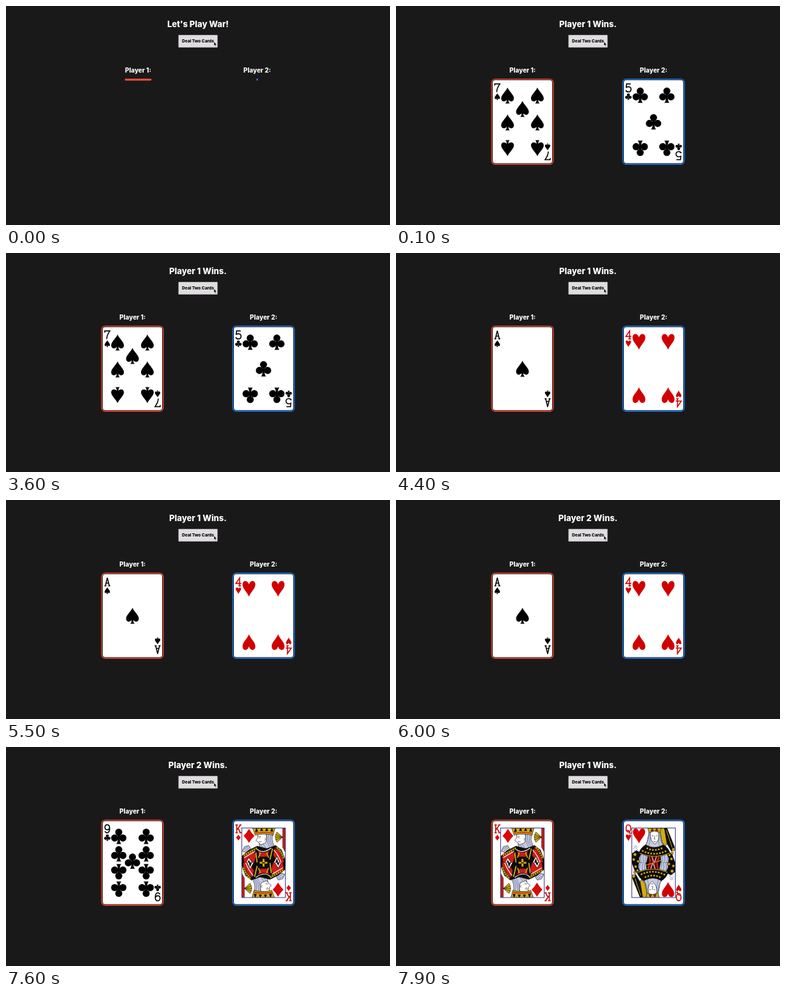
Animation, 600 px wide and 342 px high, one loop 8 s. Source, as an HTML page:

```html
<!DOCTYPE html>
<html lang="en">
<head>
<meta charset="utf-8">
<title>War</title>
<style>
html, body { margin: 0; width: 100%; height: 100%; overflow: hidden; background: #191919; }
svg { display: block; width: 600px; height: 342px; }
text { font-family: Inter, Roboto, sans-serif; font-weight: 800; text-anchor: middle; fill: #fff; }
.title { font-size: 13px; }
.label { font-size: 9.9px; }
.deal { font-size: 6.5px; fill: #000; }

/* every change is a hard cut on one shared 8 s clock */
.start, .table, .one, .two, .d1, .d2, .d3, .d4 { visibility: hidden; animation: 8s step-end -20ms infinite; }
.start { animation-name: start; }
.table { animation-name: table; }
.one { animation-name: one; }
.two { animation-name: two; }
.d1 { animation-name: d1; }
.d2 { animation-name: d2; }
.d3 { animation-name: d3; }
.d4 { animation-name: d4; }
.button { fill: #e0dde0; animation: press 8s step-end -20ms infinite; }
@keyframes start { 0% { visibility: visible } 1.25%, 100% { visibility: hidden } }
@keyframes table { 0% { visibility: hidden } 1.25%, 100% { visibility: visible } }
@keyframes one { 0%, 75% { visibility: hidden } 1.25%, 97.5%, 100% { visibility: visible } }
@keyframes two { 0%, 97.5%, 100% { visibility: hidden } 75% { visibility: visible } }
@keyframes d1 { 0%, 47.5%, 100% { visibility: hidden } 1.25% { visibility: visible } }
@keyframes d2 { 0%, 76.25%, 100% { visibility: hidden } 47.5% { visibility: visible } }
@keyframes d3 { 0%, 98.75%, 100% { visibility: hidden } 76.25% { visibility: visible } }
@keyframes d4 { 0% { visibility: hidden } 98.75%, 100% { visibility: visible } }
@keyframes press { 0%, 45%, 72.5%, 95%, 100% { fill: #e0dde0 } 43.75%, 71.25%, 93.75% { fill: #eceaec } }

.gold { fill: #d0ab14; }
.red { fill: #d01c18; }
.ink { fill: #0c0c0c; }
.pale { fill: #c6cbe0; }
.white { fill: #fff; }
.line { fill: none; }
.blue { fill: none; stroke: #4a5296; }
.goldline { fill: none; stroke: #d0ab14; }
.redline { fill: none; stroke: #d01c18; }
</style>
</head>
<body>
<svg id="stage" viewBox="0 0 600 342">
  <defs>
    <path id="spade" d="M0-12.5C2-7 10-1 10 4.5C10 9.7 4 10.7 1.3 6.8C1.5 10 2 11.5 3.6 12.5H-3.6C-2 11.5-1.5 10-1.3 6.8C-4 10.7-10 9.7-10 4.5C-10-1-2-7 0-12.5Z"/>
    <g id="club">
      <circle cy="-6.5" r="5.5"/><circle cx="-6.4" cy="2.6" r="5.6"/><circle cx="6.4" cy="2.6" r="5.6"/>
      <path d="M-2-3H2L1.4 3Q1.6 10 4 12H-4Q-1.6 10-1.4 3Z"/>
    </g>
    <path id="heart" fill="#d00000" d="M0 12.5C-2 6-10 0-10-6.3C-10-14-1.5-13.8 0-6.5C1.5-13.8 10-14 10-6.3C10 0 2 6 0 12.5Z"/>
    <path id="diamond" fill="#d80a0a" d="M0-11.5Q3.7-5 8.8 0Q3.7 5 0 11.5Q-3.7 5-8.8 0Q-3.7-5 0-11.5Z"/>
    <clipPath id="half"><rect x="-34" y="-54" width="68" height="54.2"/></clipPath>

    <g id="king" stroke="#000" stroke-width=".6">
      <!-- drape and fan -->
      <path class="red" d="M30-54H34V-17L30-24Z"/>
      <path class="gold" d="M30-40L21-48Q16-40 21-32Z"/>
      <path class="line" d="M30-40L19-44M30-40H18M30-40L19-36"/>
      <!-- head -->
      <path class="pale" d="M1-45H15Q11-37 17-26L6-22L-6-24L-7-31Z"/>
      <path class="blue" d="M5-44Q4-34 10-24M8-44Q6-34 13-25M12-44Q8-35 15-26M-5-29L0-23M-1-29L4-23"/>
      <path class="white" d="M-9-45H4Q6-36 3-31L-5-28L-8-32L-12-35L-9-39Z"/>
      <path class="line" d="M-8-41h4M-7-39h2M-7-33h4M2-39q3 1 0 4"/>
      <path class="gold" d="M-13-43L-17-54H18L15-43Q0-47-13-43Z"/>
      <path class="redline" stroke-width="1.6" d="M-13-46Q1-49 15-46"/>
      <path class="ink" d="M-13-48l2-6 2 5zM-5-50l2-4 2 4zM3-50l2-4 2 4zM11-49l2-5 2 5z"/>
      <!-- hand -->
      <path class="pale" d="M-33-18L-30-25L-23-27L-20-22L-27-16Z"/>
      <path class="blue" d="M-31-21l7-4M-29-18l7-6"/>
      <!-- robe -->
      <path class="ink" d="M-34 1V-10L-24-19L-10-26L5-22L19-27L28-20L34-5V1Z"/>
      <path class="red" d="M-30 1L-32-9L-17-19L-11-12L-15 1Z"/>
      <path class="goldline" stroke-width="3" d="M-32-11L-10-23"/>
      <path class="line" stroke-width="1.6" stroke-dasharray="1.5 2" d="M-32-11L-10-23"/>
      <path class="line" stroke="#fff" stroke-width="1.2" d="M-30-8L-13-18M-10-21Q-1-13 12-23"/>
      <path class="red" d="M-9-19Q0-13 10-20L5-9H-6Z"/>
      <path class="goldline" stroke-width="1.8" d="M-12-16L-10 0M-5-16L-8-7M5-16L8-7M14-22L10-5"/>
      <path class="red" d="M17-23L23-20L32-3V1H23L15-12Z"/>
      <path class="goldline" stroke-width="3" d="M20-25Q28-18 32-6"/>
      <path class="line" stroke-width="1.5" stroke-dasharray="1.5 2" d="M20-25Q28-18 32-6"/>
      <path class="line" stroke="#fff" stroke-width="1.1" d="M16-20Q22-14 28 0"/>
      <path class="white" d="M26 1L21-10L15 1ZM-17 1L-23-8L-28 1Z"/>
      <path class="ink" d="M23 1L21-6L18 1ZM-20 1L-23-4L-25 1Z"/>
    </g>

    <g id="queen" stroke="#000" stroke-width=".6">
      <!-- throne -->
      <path class="gold" d="M9-54H20L25-36L19-26L13-32Z"/>
      <path class="ink" d="M17-54H21L33-24L28-18L21-30Z"/>
      <path class="goldline" stroke-width="1" d="M20-51L29-24"/>
      <!-- head -->
      <path class="pale" d="M-7-49Q1-57 10-49L13-32L19-24L1-17L-15-24L-10-32Z"/>
      <path class="blue" d="M-6-46Q-8-35-13-25M-5-43Q-5-34-8-24M9-46Q9-36 15-26M8-42Q7-33 10-24"/>
      <path class="gold" d="M-7-47L-9-54H12L10-47Q2-52-7-47Z"/>
      <path class="red" d="M-4-50l2-4 2 4zM3-50l2-4 2 4z"/>
      <path class="white" d="M-5-47Q2-52 8-47Q10-35 2-29Q-6-35-5-47Z"/>
      <path class="line" d="M-3-42h3M4-42h3M2-42l-1 5h2M0-33h4"/>
      <!-- gown -->
      <path class="ink" d="M-34 1V-14L-27-19L-19-15L-16 1ZM17 1L21-16L29-13L34 1Z"/>
      <path class="pale" d="M-18-17L-8-10L-10 1H-22L-23-7ZM20-17L10-10L11 1H23L24-7Z"/>
      <path class="blue" d="M-19-14Q-22-6-19 0M-15-13Q-18-6-15 0M-11-11Q-14-5-12 0M21-14Q24-6 20 0M17-13Q19-6 16 0M13-11Q15-5 13 0"/>
      <path class="ink" d="M-8-14H10L12 1H-11Z"/>
      <path class="redline" stroke-width="2.6" d="M-7-12L-5 0M9-12L6 0M-2-11L-1 0M4-11L3 0"/>
      <path class="line" stroke="#dde" stroke-width="1" d="M-4-12L1-1L6-12"/>
      <path class="ink" d="M-23-15Q-19-25-12-28Q1-20 15-28Q22-25 26-15Q1-4-23-15Z"/>
      <path class="goldline" stroke-width="2.4" stroke-dasharray="2.6 2" d="M-18-19Q1-9 21-19M-11-23Q1-17 14-23"/>
      <path class="goldline" stroke-width="1" d="M-22-15Q1-5 25-15"/>
      <!-- flowers -->
      <g class="gold"><circle cx="-29" cy="-13" r="2.6"/><circle cx="-31" cy="-5" r="2.3"/><circle cx="-24" cy="-2" r="2.3"/><circle cx="28" cy="-6" r="2.3"/><circle cx="25" cy="-12" r="2"/><circle cx="31" cy="-21" r="2.5"/><circle cx="29" cy="-15" r="2"/></g>
      <path class="blue" d="M-32-21q3-5 6-1t-5 3M-31-25q4-3 6 1"/>
    </g>
  </defs>

  <rect width="600" height="342" fill="#191919"/>
  <text class="title start" x="300" y="33.3">Let's Play War!</text>
  <text class="title one" x="300" y="33.3">Player 1 Wins.</text>
  <text class="title two" x="300" y="33.3">Player 2 Wins.</text>

  <rect class="button" x="269.5" y="45.3" width="61" height="19.4"/>
  <text class="deal" x="300" y="57.3">Deal Two Cards</text>
  <path d="M325 55.8v6.2l1.4-1.2 1 2.2 1-.5-1-2h1.9z" fill="#000" stroke="#fff" stroke-width=".4"/>

  <g class="start">
    <text class="label" x="206.5" y="103.7">Player 1:</text>
    <text class="label" x="392.5" y="103.7">Player 2:</text>
    <rect x="185.8" y="113.6" width="41.4" height="2.8" rx=".8" fill="#f4503d"/>
    <rect x="391.2" y="113.6" width="2.8" height="2.8" rx=".8" fill="#3b72d9"/>
  </g>
  <g class="table">
    <text class="label" x="197.8" y="103.7">Player 1:</text>
    <text class="label" x="402.5" y="103.7">Player 2:</text>
  </g>
</svg>
<script>
const stage = document.getElementById('stage');
const seats = [{ x: 197.6, color: '#e2432e' }, { x: 402.4, color: '#1a73e0' }];
const ranks = {
  4: 'M2 6.5V-6.2L-4 2.6H4.6M0 6.3H4',
  5: 'M3.6-6.2H-2.8L-3.3-.8C1-3 4.2-.8 4.2 2C4.2 7.6-2.6 7.4-4 3.8',
  7: 'M-4-3.6V-6.2H4C1-2 -1 2-1 6.6',
  9: 'M-3.6 3.6C-2.4 7.4 3.8 7.8 3.6-1.4C3.5-8-3.8-8-3.8-2.2C-3.8 2.4 2.6 2.6 3.5-1.6',
  A: 'M-3 6L0-6.4L3 6M-2 2H2M-4.6 6.2H-1.6M1.6 6.2H4.6',
  K: 'M-2.6-6.2V6.2M3.4-6.2L-2.4 1.6M-.6-1L3.4 6.2M-4.6-6.2H-.8M-4.6 6.2H-.8M1.6-6.2H4.8M1.6 6.2H4.8',
  Q: 'M0-6.3C-4.8-6.3-4.8 5 0 5C4.8 5 4.8-6.3 0-6.3M-2 2.6Q1 2 1.6 5.4T4.4 6'
};

const pip = (suit, x, y, size = 1, turn = 0) =>
  `<use href="#${suit}" transform="translate(${x} ${y}) rotate(${turn}) scale(${size})"/>`;
const twice = art => art + `<g transform="rotate(180)">${art}</g>`;
// the same pip left and right
const pair = (suit, x, y, turn) => pip(suit, -x, y, 1, turn) + pip(suit, x, y, 1, turn);

function court(figure, suit) {
  const belt = figure === 'king'
    ? '<path class="ink" d="M-9-8H9V8H-9Z"/><path class="goldline" d="M-6 0H6M0-6V6" stroke-width="3"/><path d="M-2 0H2" stroke="#000" stroke-width="1.5"/>'
    : '<path class="goldline" d="M-13 4L13-4"/>';
  return twice(`<use href="#${figure}" clip-path="url(#half)"/>` + pip(suit, -22.7, -42, .96)) + belt +
    '<rect x="-34" y="-54.3" width="68" height="108.6" fill="none" stroke="#23237c" stroke-width=".9"/>';
}

function card(deal, seat, rank, suit, art) {
  const red = suit === 'heart' || suit === 'diamond';
  const corner =
    `<path d="${ranks[rank]}" transform="translate(-39.3 -53)" fill="none" stroke="${red ? '#d00000' : '#000'}" stroke-width="1.6"/>` +
    pip(suit, -39.3, -39.3, .42);
  return `<g class="${deal}" transform="translate(${seats[seat].x} 180.8)">${art}${twice(corner)}</g>`;
}

const blanks = seats.map(s => `<g class="table" transform="translate(${s.x} 180.7)">
  <rect x="-48.1" y="-66.4" width="96.2" height="132.8" rx="5.5" fill="#0c0c0c" stroke="${s.color}" stroke-width="1.6"/>
  <rect x="-46.4" y="-64.9" width="92.8" height="129.8" rx="4" fill="#fff"/></g>`).join('');

const clubRows = (x, y) => pair('club', x, -y) + pair('club', x, y, 180);

stage.insertAdjacentHTML('beforeend', blanks +
  card('d1', 0, 7, 'spade', pair('spade', 23.3, -41) + pip('spade', 0, -20) + pair('spade', 23.3, 1) + pair('spade', 23.3, 41.3, 180)) +
  card('d1', 1, 5, 'club', clubRows(20.8, 41.5) + pip('club', 0, 0)) +
  card('d2', 0, 'A', 'spade', pip('spade', 0, 0)) +
  card('d2', 1, 4, 'heart', pair('heart', 22.8, -42.3) + pair('heart', 22.8, 41.3, 180)) +
  card('d3', 0, 9, 'club', clubRows(21.4, 41.3) + clubRows(21.4, 14) + pip('club', 0, -2.5)) +
  card('d3', 1, 'K', 'diamond', court('king', 'diamond')) +
  card('d4', 0, 'K', 'diamond', court('king', 'diamond')) +
  card('d4', 1, 'Q', 'heart', court('queen', 'heart')));
</script>
</body>
</html>
```
